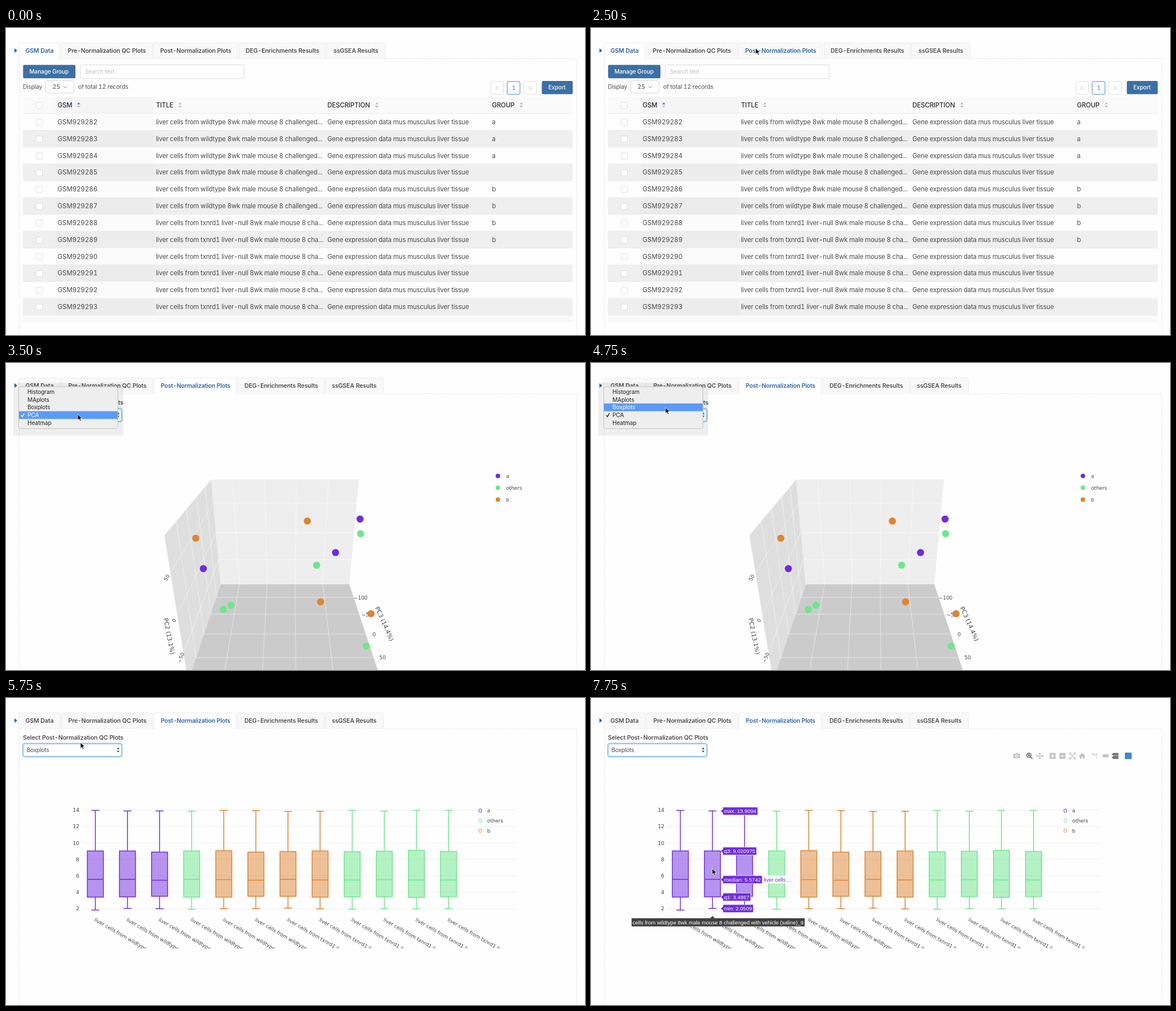
Write an HTML page that moves like this. It is 1027x545 px and loops after 8000 ms.

```html
<!DOCTYPE html>
<html lang="en">
<head>
<meta charset="utf-8">
<title>GSM data and plots</title>
<style>
html, body { margin: 0; width: 100%; height: 100%; overflow: hidden; background: #fefefe; }
svg { display: block; width: 1027px; height: 545px; }
text {
  font-family: Inter, "Noto Sans", sans-serif; font-variant-numeric: tabular-nums;
  letter-spacing: -.15px; fill: #4c4c4c; white-space: pre;
}
.plot text { font-family: "DejaVu Sans", Verdana, sans-serif; letter-spacing: 0; fill: #444; }
.tip text { font-family: "Liberation Sans", Arial, sans-serif; letter-spacing: 0; fill: #fff; }
</style>
</head>
<body>
<svg id="stage" viewBox="0 0 1027 545"></svg>
<script>
const LOOP = 8000;
const BLUE = '#2f66a5', BUTTON = '#3c6fa3', LINE = '#e6e6e6';
const COLOR = { a: '#702bdf', o: '#6de78b', b: '#de8432' };

const rect = (x, y, x2, y2, fill, extra = '') =>
  `<rect x="${x}" y="${y}" width="${x2 - x}" height="${y2 - y}" fill="${fill}" ${extra}/>`;
const path = (d, stroke, w = 1, fill = 'none', extra = '') =>
  `<path d="${d}" fill="${fill}" stroke="${stroke}" stroke-width="${w}" ${extra}/>`;
const poly = (pts, fill) => `<polygon points="${pts}" fill="${fill}"/>`;
const dot = (x, y, r, fill) => `<circle cx="${x}" cy="${y}" r="${r}" fill="${fill}"/>`;
const text = (x, y, s, size, style = '', extra = '') =>
  `<text x="${x}" y="${y}" style="font-size:${size}px;${style}" ${extra}>${s}</text>`;
const turned = (x, y, s, size, deg) =>
  text(0, size * .36, s, size, '', `text-anchor="middle" transform="translate(${x} ${y}) rotate(${deg})"`);
const group = (id, body, cls = '') => `<g id="${id}" class="${cls}">${body}</g>`;
const framed = s => `stroke="${s}" rx="2.5"`;

// Tabs
const LABELS = ['GSM Data', 'Pre-Normalization QC Plots', 'Post-Normalization Plots',
  'DEG-Enrichments Results', 'ssGSEA Results'];

function tabs(id, edges, xs, active, size) {
  let s = path('M23.5 545V54.5H1012.5V545', LINE, 1, 'none', 'stroke-dasharray="3 1"');
  LABELS.forEach((label, i) => {
    const [l, r] = edges[i], on = i === active;
    s += path(`M${l + .5} 54.5V29Q${l + .5} 26.5 ${l + 3} 26.5H${r - 3}Q${r - .5} 26.5 ${r - .5} 29V54.5`,
      LINE, 1, on ? '#fefefe' : '#f9f9f9', 'stroke-dasharray="3 1"');
    if (on) s += rect(l + 1, 54, r - 1, 55.2, '#fefefe');
    s += text(xs[i], 43.8, label, i === 2 ? size : 10.6,
      `font-weight:600;fill:${on ? BLUE : '#505050'}`, `class="tab${i}"`);
  });
  return group(id, s);
}

// Data table
function sorter(x, up) {
  return poly(`${x - 3},135.6 ${x},132 ${x + 3},135.6`, up ? '#3f83d8' : '#bbb') +
    poly(`${x - 3},138 ${x},141.6 ${x + 3},138`, '#bbb');
}

function table() {
  const check = y => rect(53.5, y - 5.5, 64.5, y + 5.5, '#fff', 'stroke="#dcdcdc" rx="1.5"');
  let s = rect(30.3, 65.4, 123.2, 89.2, BUTTON, 'rx="2.5"') +
    text(41.5, 80.8, 'Manage Group', 10.1, 'fill:#fff;font-weight:500') +
    rect(132, 65.5, 422.5, 89.8, '#fff', framed('#d9d9d9')) +
    text(140, 81.3, 'Search text', 10.1, 'fill:#bdbdbd') +
    text(30, 107.8, 'Display', 10.2) +
    rect(70.5, 93.5, 120.5, 115.5, '#fff', framed('#d9d9d9')) +
    text(82.5, 108, '25', 10.5) + path('M102 103.5l3 3l3-3', '#777', 1) +
    text(128, 107.8, 'of total 12 records', 10.5) +
    rect(860, 95, 882.5, 117.8, '#fff', framed('#dcdcdc')) +
    rect(889, 95, 911.7, 117.8, '#fff', framed('#3f83d8')) +
    rect(918, 95, 940.7, 117.8, '#fff', framed('#dcdcdc')) +
    path('M873.5 103.8l-5 2.9l5 2.9M927 103.8l5 2.9l-5 2.9', '#c4c4c4', 1) +
    text(897.2, 110, '1', 10.3, 'fill:#3f83d8') +
    rect(950.4, 94, 1005.3, 117.4, BUTTON, 'rx="2.5"') +
    text(962, 109.3, 'Export', 10.1, 'fill:#fff;font-weight:500') +
    rect(30, 122, 1005, 152, '#fafafa') + rect(88, 122, 262, 152, '#f5f5f5') +
    path('M30 151.8H1005', '#e9e9e9') + check(137.5);
  [['GSM', 91.5, 129], ['TITLE', 266, 308.5], ['DESCRIPTION', 570, 658], ['GROUP', 862, 914]]
    .forEach(([name, x, sx], i) => {
      s += text(x, 141.2, name, 11.5, 'font-weight:500;fill:#2e2e2e') + sorter(sx, !i);
    });
  for (let i = 0; i < 12; i++) {
    const mid = 167 + 29.83 * i, top = mid - 15;
    s += i % 2 ? rect(30, top, 1005, top + 29.8, '#efefef') : rect(88, top, 262, top + 29.8, '#fbfbfb');
    if (i % 2) s += rect(88, top, 262, top + 29.8, '#ececec');
    s += path(`M30 ${top + 29.8}H1005`, '#e9e9e9') + check(mid + .5);
    const title = i < 6 ? 'liver cells from wildtype 8wk male mouse 8 challenged...'
      : 'liver cells from txnrd1 liver-null 8wk male mouse 8 cha...';
    s += text(91.5, mid + 4, 'GSM' + (929282 + i), 11.4, 'letter-spacing:.05px') +
      text(266, mid + 4, title, 11.4) +
      text(570, mid + 4, 'Gene expression data mus musculus liver tissue', 11.4) +
      text(862, mid + 4, 'aaa bbbb    '[i], 11.4);
  }
  return group('table', s + rect(30, 511, 1005, 520, '#fafafa') + path('M30 520.5H1005', '#e9e9e9'));
}

// Drop-down above the plots
function picker() {
  const arrows = poly('196.8,91 199,87.6 201.2,91', '#444') + poly('196.8,93.4 199,96.8 201.2,93.4', '#444');
  return group('picker',
    text(30, 73.8, 'Select Post-Normalization QC Plots', 10.6, 'font-weight:600;fill:#505050') +
    `<g id="focus">${rect(29.5, 80.5, 206, 104.5, 'none', 'stroke="#b9dcf8" stroke-width="2.4" rx="4"')}</g>` +
    rect(30.5, 81.5, 205, 103.5, '#fff', 'id="field" stroke="#ccc" rx="3"') +
    text(36.5, 96.2, 'PCA', 10.1, '', 'id="chosen"') + arrows);
}

function menu() {
  const items = ['Histogram', 'MAplots', 'Boxplots', 'PCA', 'Heatmap'];
  let s = rect(13, 35, 208, 129, '#000', 'opacity=".06"') +
    rect(22.5, 42, 198.5, 116.5, '#eee', 'stroke="#c2c2c2" rx="4"') +
    rect(23, 0, 198, 13.8, '#5b9af7', 'id="mark"');
  items.forEach((name, i) => {
    s += text(38, 54.8 + 13.8 * i, name, 10.2, '', 'class="item"');
  });
  return group('menu', s + path('M27 92.6l2 2.8l3.6-6', '#222', 1.4, 'none', 'id="tick"'));
}

// 3D scatter: walls, grid segments, labels and dots are projected points
function cube(id, v) {
  let s = poly(v.left, '#dedede') + poly(v.back, '#eee') + poly(v.floor, '#cbcbcb') +
    path(v.grid, '#fff', .9, 'none', 'opacity=".6"');
  v.labels.forEach(l => s += turned(l[0], l[1], l[2], /PC/.test(l[2]) ? 10.6 : 8.9, l[3]));
  for (const k in v.dots) v.dots[k].forEach(([x, y]) => s += dot(x, y, 6.3, COLOR[k]));
  [['a', 'a', 200.5], ['o', 'others', 221.5], ['b', 'b', 242.5]].forEach(([k, name, y]) => {
    s += dot(872.5, y, 4, COLOR[k]) + text(887, y + 3.2, name, 8.9);
  });
  return group(id, s, 'plot');
}

const firstView = {
  left: '260,242 417,237 421,422 282,523',
  back: '417,237 661,238 649,444 421,422',
  floor: '421,422 649,444 631,576 282,523',
  grid: 'M302 240L318 497L636 543M341 239L352 472L640 510M372 238L379 452L643 483M398 238L403 436L645 462' +
    'M450 237L452 425L332 531M500 238L498 430L390 540M553 238L548 435L460 550M605 238L599 439L545 562' +
    'M266 304L418 278L659 284M272 381L419 328L656 338M277 460L420 377L653 390',
  labels: [[253, 307, '50', -9], [259, 386, '0', -18], [265.5, 462, '−50', -26], [315, 538, '100', -33],
    [386, 550, '50', -38], [662, 461.5, '−100', 5], [659.5, 483, '−50', 6], [656.5, 510, '0', 7],
    [653, 541.5, '50', 8], [239, 402, 'PC2 (13.1%)', 84], [686, 499, 'PC3 (14.4%)', -88]],
  dots: {
    b: [[343.5, 289], [568, 311], [597, 412], [560, 438]],
    a: [[344, 335], [599, 250.5], [560.5, 316]],
    o: [[390, 414], [380.5, 424.5], [619, 295], [565, 377], [626, 519]]
  }
};
const secondView = {
  left: '281,306 364,207 381,393 323,565',
  back: '364,207 626,207 609,393 381,393',
  floor: '381,393 609,393 666,565 323,565',
  grid: 'M353 220L373 416H617M338 238L363 446H626M320 260L351 481H638M302 281L337 523H652' +
    'M402 207L414 393L388 545M459 207L463 393L455 545M515 207L513 393L514 545M572 207L562 393L580 545' +
    'M292 372L368 249H622M304 448L372 301H617M315 515L377 349H613',
  labels: [[285, 381, '50', -60], [298, 457, '0', -65], [310, 523, '−50', -68], [629, 416.5, '−100', 0],
    [640, 446.5, '−50', 0], [653, 481.5, '0', 0], [668, 523, '50', 0],
    [289.5, 485, 'PC2 (13.1%)', 79], [671.5, 463, 'PC3 (14.4%)', 66]],
  dots: {
    b: [[336.5, 311], [534.5, 280.5], [558, 424], [647.5, 445]],
    a: [[350, 365], [628, 277], [584.5, 336.5]],
    o: [[385.5, 437.5], [399, 430], [629, 303], [551, 359], [639, 502.5]]
  }
};

// Box plot
const boxX = i => 158.5 + 56.95 * i;
const MAX = [199.5, 200.5, 200.5, 201, 199.5, 200, 201.5, 201, 199.5, 201, 199.5, 199.5];
const Q3 = [271.5, 271.5, 273.5, 271.5, 271, 273.5, 272.5, 271.5, 273, 272, 270.5, 272.5];
const MED = [322, 322, 323.5, 322, 322.5, 323.5, 322, 323, 323, 322.5, 323, 323];
const Q1 = [353.5, 353, 352, 353.5, 353.5, 352, 352, 353.5, 353, 352.5, 354, 352.5];
const MIN = [376.5, 373.5, 374, 375, 374, 374, 373, 374.5, 375, 374, 374.5, 374];

function boxes() {
  let s = '<clipPath id="cut"><rect x="72" y="380" width="900" height="64.5"/></clipPath>', names = '';
  for (let v = 2; v <= 14; v += 2) {
    const y = 199 + (14 - v) * 14.583;
    s += path(`M136 ${y}H904`, '#eee') + text(130, y + 3.3, v, 9.1, '', 'text-anchor="end"');
  }
  [...'aaaobbbboooo'].forEach((k, i) => {
    const x = boxX(i), c = COLOR[k];
    s += path(`M${x - 14.2} ${Q1[i]}V${Q3[i]}h28.4V${Q1[i]}z`, c, 1.5, c, 'fill-opacity=".5"') +
      path(`M${x - 14.2} ${MED[i]}h28.4M${x} ${Q3[i]}V${MAX[i]}m-7 0h14M${x} ${Q1[i]}V${MIN[i]}m-7 0h14`, c, 1.5);
    names += text(0, 0, `liver cells from ${i < 6 ? 'wildtype' : 'txnrd1 liver-null'} 8wk`, 8.9, '',
      `transform="translate(${x - 2.5} 395.5) rotate(30)"`);
  });
  s += `<g clip-path="url(#cut)">${names}</g>`;
  [['a', 'a', 200], ['o', 'others', 217.5], ['b', 'b', 235.5]].forEach(([k, name, y]) => {
    s += `<ellipse cx="841.3" cy="${y}" rx="2.6" ry="3.2" fill="none" stroke="${COLOR[k]}"/>` +
      text(853.5, y + 3.2, name, 8.9);
  });
  return group('boxes', s, 'plot');
}

function toolbar() {
  const g = '#c3c3c3', d = '#777';
  const tag = (x, y, c) => poly(`${x - 6},${y} ${x - 3},${y - 2.6} ${x + 6},${y - 2.6} ${x + 6},${y + 2.6} ${x - 3},${y + 2.6}`, c);
  return group('bar',
    rect(749, 99, 761, 107, g, 'rx="1.5"') + rect(753, 97.5, 757, 100, g) + dot(755, 103, 2.6, '#fff') + dot(755, 103, 1.4, g) +
    `<circle cx="776.8" cy="101.8" r="3.8" fill="none" stroke="${d}" stroke-width="1.8"/>` +
    path('M779.5 104.5l3.5 3.5', d, 2) + rect(775, 100, 778.6, 103.6, d) +
    path('M796 97.5V108.5M790.5 103H801.5M794 99.5l2-2l2 2M794 106.5l2 2l2-2M792.5 101l-2 2l2 2M799.5 101l2 2l-2 2', g, 1.2) +
    rect(813.5, 97.5, 824, 108, g) + path('M818.7 99.5v6.5M815.5 102.7h6.5', '#fff', 1.6) +
    rect(831, 97.5, 841.5, 108, g) + path('M833 102.7h6.5', '#fff', 1.6) +
    path('M848.5 100.5v-3h3M856 97.5h3v3M859 105v3h-3M851.5 108h-3v-3M850 99l8 8M858 99l-8 8', g, 1.3) +
    poly('865.5,103 871.3,97.5 877,103 875.5,103 875.5,108 872.5,108 872.5,104.5 870,104.5 870,108 867,108 867,103', g) +
    path('M888 99.5h5M896.5 98.5v5M896.5 105.5v2M892 100l2 2', g, 1.5) + tag(912, 102.7, g) +
    tag(929.5, 100, d) + tag(929.5, 105.6, d) + rect(947, 97, 959, 108.5, '#3d86dc'));
}

const pen = document.createElement('canvas').getContext('2d');
pen.font = '9.47px "Liberation Sans", Arial, sans-serif';
const textWidth = s => pen.measureText(s).width;

function tooltip(id, n, values) {
  const x = boxX(n), c = COLOR.a;
  const label = `liver cells from wildtype 8wk male mouse 8 challenged with vehicle (saline)_${8 + n}`;
  let s = '';
  [MAX, Q3, MED, Q1, MIN].forEach((row, k) => {
    const y = row[n] + .3, stat = `${['max', 'q3', 'median', 'q1', 'min'][k]}: ${values[k]}`;
    const w = textWidth(stat) + 4.5, l = x + 18.5;
    if (k === 2) s += rect(l + w, y - 7, l + w + textWidth('liver cells ...') + 4, y + 7, '#fff', 'opacity=".85"') +
      text(l + w + 2.5, y + 3.3, 'liver cells ...', 9.47, `fill:${c}`);
    s += path(`M${l - 4} ${y}L${l} ${y - 3.5}V${y - 7}h${w}v14h${-w}V${y + 3.5}z`, '#fff', .7, c) +
      text(l + 2, y + 3.3, stat, 9.47);
  });
  const half = textWidth(label) / 2 + 2;
  s += `<g clip-path="url(#cut)">` +
    path(`M${x - half} 391H${x - 4}L${x} 387L${x + 4} 391H${x + half}V405.5H${x - half}z`, 'none', 0, '#424242') +
    text(x, 401.6, label, 9.47, '', 'text-anchor="middle"') + '</g>';
  return group(id, s, 'tip');
}

const stage = document.getElementById('stage');
stage.innerHTML =
  tabs('tabsA', [[23, 95], [97, 260], [261, 411], [413, 567], [568, 673]], [34.5, 109.5, 273.5, 425, 581], 0, 10.6) +
  tabs('tabsB', [[22, 97], [98, 261], [262, 409], [410, 565], [566, 670]], [34.5, 110.5, 274.5, 423, 578], 2, 10.4) +
  poly('15,36 20,40 15,44', BLUE) + table() + cube('cubeA', firstView) + cube('cubeB', secondView) +
  boxes() + toolbar() +
  tooltip('tip0', 0, ['13.9552', '9.013325', '5.5831', '3.4615', '1.8507']) +
  tooltip('tip1', 1, ['13.9094', '9.020975', '5.5742', '3.4867', '2.0509']) +
  picker() + menu() +
  group('cursor', path('M0 0V10.4L2.5 8.1L4.3 12L6.1 11.2L4.4 7.5H7.8z', '#fff', .8, '#000'));

const $ = id => document.getElementById(id);
const show = (id, on) => { $(id).style.display = on ? '' : 'none'; };

// time, view, cursor x, cursor y, highlighted menu item, hovered box
const STEPS = [
  [0, 'table'],
  [500, 'table', 145, 29],
  [750, 'table', 198, 33],
  [1000, 'table', 250, 37],
  [1250, 'table', 280, 38],
  [1500, 'table', 292, 36],
  [2750, 'cubeA', 292, 36],
  [3000, 'cubeB', 292, 36],
  [3250, 'cubeB', 127, 91],
  [3500, 'cubeB', 127, 91, 3],
  [4250, 'cubeB', 130, 86, 3],
  [4500, 'cubeB', 132, 79, 2],
  [5250, 'cubeB', 132, 79],
  [5500, 'boxes', 132, 79],
  [6250, 'boxes', 126, 215],
  [6500, 'boxes', 130, 290],
  [6750, 'boxes', 156, 302, null, 0],
  [7000, 'boxes', 158, 303, null, 0],
  [7500, 'boxes', 215, 303, null, 1]
];

function draw(t) {
  const [at, view, x, y, item, hover] = STEPS.filter(s => s[0] <= t).pop();
  ['table', 'cubeA', 'cubeB', 'boxes'].forEach(id => show(id, id === view));
  const early = at < 3000, open = item != null;
  show('tabsA', early);
  show('tabsB', !early);
  document.querySelector('#tabsA .tab2').style.fill = x > 261 ? BLUE : '#505050';
  show('picker', view !== 'table');
  show('focus', at >= 3250);
  $('field').setAttribute('stroke', at >= 3250 ? '#6cb2ec' : '#ccc');
  $('chosen').textContent = at >= 5250 ? 'Boxplots' : 'PCA';
  show('menu', open);
  if (open) {
    $('mark').setAttribute('y', 44.3 + 13.75 * item);
    $('tick').setAttribute('stroke', item === 3 ? '#fff' : '#222');
    document.querySelectorAll('.item').forEach((el, i) => { el.style.fill = i === item ? '#fff' : '#222'; });
  }
  show('bar', at >= 6250);
  show('tip0', hover === 0);
  show('tip1', hover === 1);
  show('cursor', x != null);
  if (x != null) $('cursor').setAttribute('transform', `translate(${x} ${y})`);
}

const start = performance.now();
function tick() {
  draw((performance.now() - start) % LOOP);
  requestAnimationFrame(tick);
}
tick();
</script>
</body>
</html>
```
